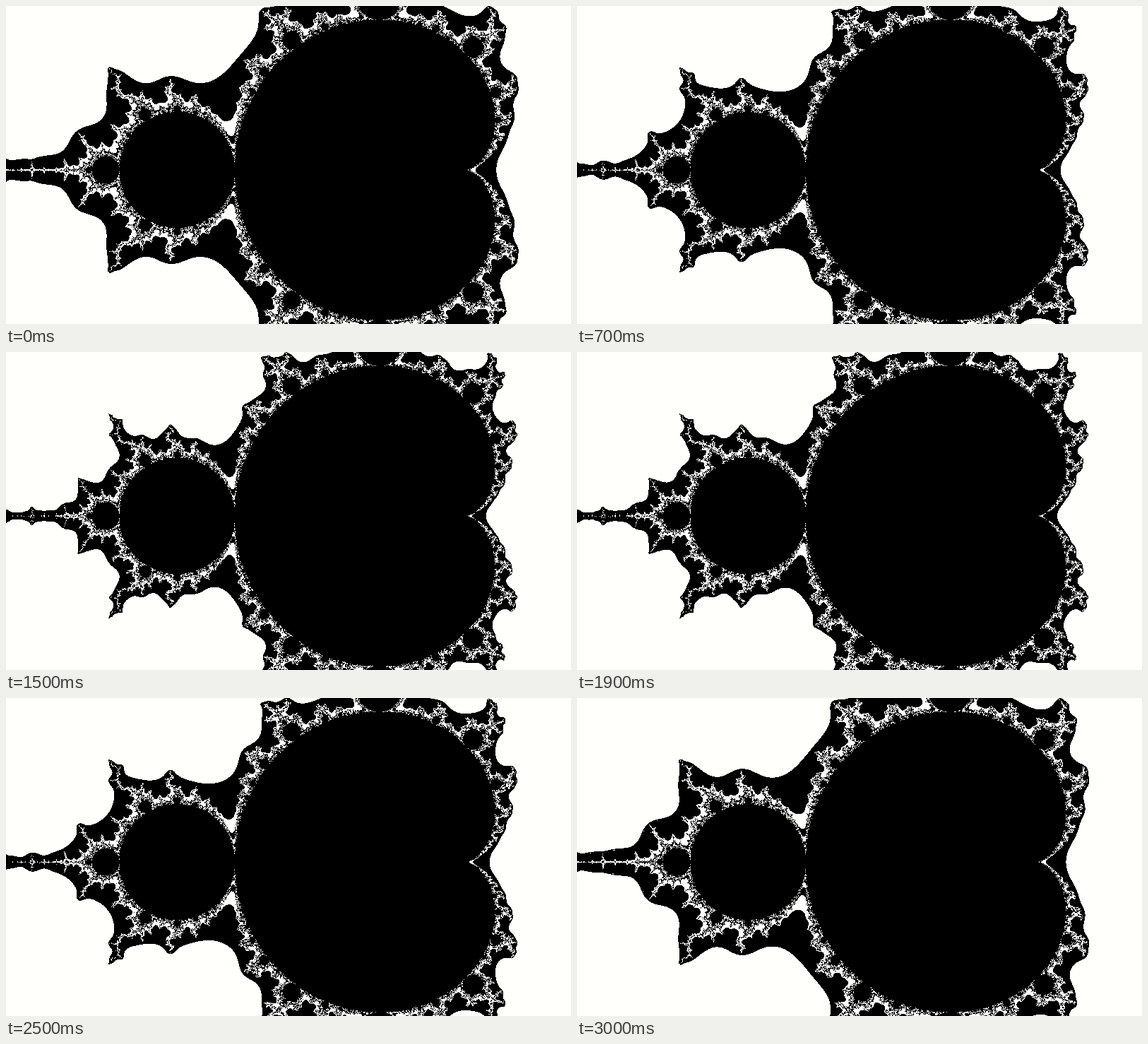
Write an HTML page with a canvas that moves like this. It is 800x450 px and loops after 3.1 s.

```html
<!DOCTYPE html>
<html lang="en">
<head>
<meta charset="utf-8">
<title>Mandelbrot bands</title>
<style>
  html, body { margin: 0; width: 100%; height: 100%; overflow: hidden; background: #fffffc; }
  canvas { display: block; width: 800px; height: 450px; }
</style>
</head>
<body>
<canvas id="stage" width="800" height="450"></canvas>
<script>
const W = 800, H = 450;
const SCALE = 327, ORIGIN_X = 568.8, ORIGIN_Y = 231.6;
const MAX_ITER = 256;
const LOOP = 3100, STEP = 100, STEPS = 30;
const MIN_BAND = 6.53, BAND_SWING = 1.92;
const WHITE = 0xfffcffff, BLACK = 0xff000000; // ABGR

const ctx = document.getElementById('stage').getContext('2d');
const image = ctx.createImageData(W, H);
const pixels = new Uint32Array(image.data.buffer);

function inMainBulbs(cx, cy) {
  const y2 = cy * cy, u = cx - 0.25, q = u * u + y2;
  return q * (q + u) <= 0.25 * y2 || (cx + 1) ** 2 + y2 <= 0.0625;
}

// Smooth escape count, or -1 inside the set.
function escapeCount(cx, cy) {
  if (inMainBulbs(cx, cy)) return -1;
  let x = 0, y = 0;
  for (let n = 1; n <= MAX_ITER; n++) {
    const nx = x * x - y * y + cx;
    y = 2 * x * y + cy;
    x = nx;
    const r2 = x * x + y * y;
    if (r2 > 4) return Math.max(0, n - Math.log2(Math.log2(r2) / 2));
  }
  return -1;
}

const counts = new Float32Array(W * H);
for (let j = 0, p = 0; j < H; j++) {
  for (let i = 0; i < W; i++, p++) {
    counts[p] = escapeCount((i - ORIGIN_X) / SCALE, (ORIGIN_Y - j) / SCALE);
  }
}

// Bands of equal width alternate white and black, counted from zero.
function paint(band) {
  for (let p = 0; p < counts.length; p++) {
    const v = counts[p];
    pixels[p] = v < 0 || Math.floor(v / band) & 1 ? BLACK : WHITE;
  }
  ctx.putImageData(image, 0, 0);
}

let shown = -1;
function tick() {
  const t = performance.now() % LOOP;
  const step = Math.max(0, Math.floor(t / STEP) - 1);
  if (step !== shown) {
    shown = step;
    paint(MIN_BAND + BAND_SWING * Math.sin(Math.PI * step / STEPS));
  }
  requestAnimationFrame(tick);
}
tick();
</script>
</body>
</html>
```
